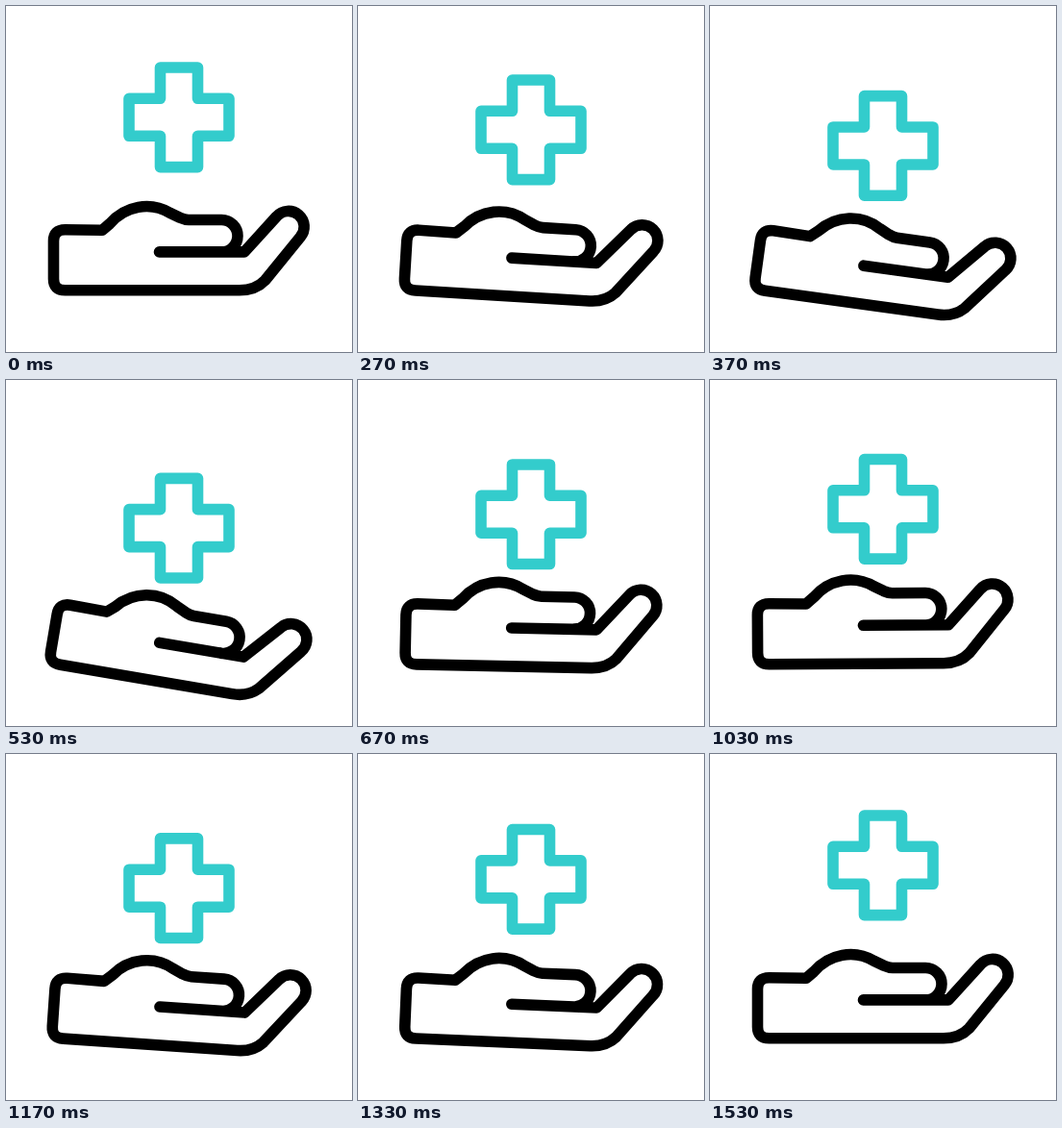
An HTML page for the animation above (1670 ms loop, 360 px wide and 360 px high).

```html
<!DOCTYPE html>
<html lang="en">
<head>
<meta charset="utf-8">
<title>Caring hand</title>
<style>
  html, body { margin: 0; width: 100%; height: 100%; overflow: hidden; background: #fff; }
  svg { display: block; width: 100%; height: 100%; }
  path { fill: none; stroke-width: 11.6; stroke-linecap: round; stroke-linejoin: round; }
</style>
</head>
<body>
<svg viewBox="0 0 360 360">
  <path id="cross" stroke="#33cccc" d="M160.5 64H199.5V96.3H232V135.3H199.5V167.6H160.5V135.3H128V96.3H160.5Z"/>
  <path id="hand" stroke="#000" d="M159.5 255.9H248L281.5 219A16.2 16.2 0 0 1 306.2 240.4L269.5 285.5Q259.5 295.8 243 295.8
    H61.5Q49.5 295.8 49.5 284V244.5Q49.5 232.8 61.5 232.8L100 233.3L108 226.5C124 208 150 203 171 215.5L181 220.3
    Q186 222.5 190 222.5H224.3A16.7 16.7 0 0 1 224.3 255.9"/>
</svg>
<script>
const LOOP = 1670, FRAME = 33.4;
const START = 4, SPAN = 10.5; // in frames, one span between successive poses
const DROPS = [0, 40, 10, 24, 0];
const ANGLES = [0, 10.6, -7, 4, 0];

const cross = document.getElementById('cross');
const hand = document.getElementById('hand');

function poseAt(values, frame) {
  const last = values.length - 1;
  const pos = Math.min(last, Math.max(0, (frame - START) / SPAN));
  const i = Math.min(last - 1, Math.floor(pos));
  const s = pos - i;
  return values[i] + (values[i + 1] - values[i]) * s * s * (3 - 2 * s);
}

function draw(now) {
  const frame = Math.floor((now % LOOP) / FRAME + 0.2);
  cross.setAttribute('transform', `translate(0 ${poseAt(DROPS, frame)})`);
  hand.setAttribute('transform', `rotate(${poseAt(ANGLES, frame)} 56 266)`);
  requestAnimationFrame(draw);
}
draw(performance.now());
</script>
</body>
</html>
```
